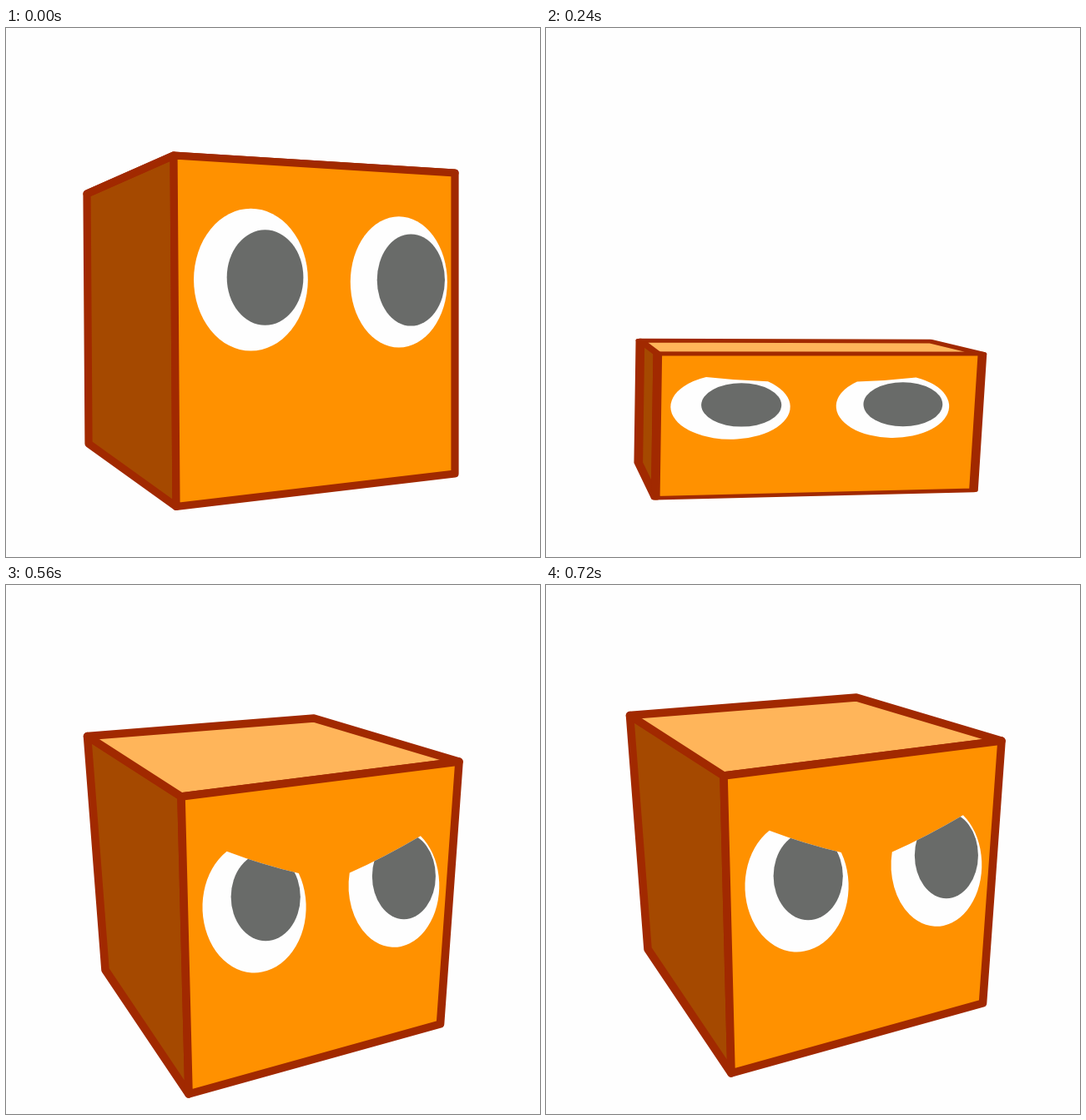
Recreate the animation shown at these times as an HTML page with a canvas. Size 640x635 px, loop 0.88 s.

```html
<!DOCTYPE html>
<html lang="en">
<head>
<meta charset="utf-8">
<title>Bouncing cube</title>
<style>
html, body { margin: 0; width: 100%; height: 100%; overflow: hidden; background: #fefefe; }
canvas { display: block; }
</style>
</head>
<body>
<canvas id="stage" width="640" height="635"></canvas>
<script>
const ctx = document.getElementById('stage').getContext('2d');
const LOOP = 880, STEP = 80;
const OPEN = [[-90, -90], [-90, -90]];

// front: corners clockwise from top left. back: top left, bottom left, far corner of the visible cap.
// pen: stroke width and its vertical squash. eyes: centres as fractions of the front face.
// size: eye radii as fractions of the face. gaze: pupil shift in eye radii.
// lids: angles in degrees where each lid meets the rim of its eye.
const rest = {
  front: [[201, 153], [538, 174], [538, 535], [204, 574.5]],
  back: [[97, 199], [99, 499], [201, 153]],
  pen: [9.2, 1],
  eyes: [[.272, .354], [.8, .362]], size: [.19, .211], gaze: [.25, -.03], lids: OPEN
};
const squash = {
  front: [[143.5, 341.5], [531, 342], [508, 548.5], [144, 569.5]],
  back: [[96.5, 306], [98, 474], [390, 308]],
  pen: [9.7, .57],
  eyes: [[.25, .379], [.763, .392]], size: [.184, .235], gaze: [.175, -.08], lids: OPEN
};
const flat = {
  front: [[126, 430.5], [516.5, 430.5], [516, 560], [121, 560]],
  back: [[126, 430.5], [121, 560], [516.5, 430.5]],
  pen: [11.5, .33],
  eyes: [[.211, .367], [.707, .367]], size: [.177, .223], gaze: [.19, -.04],
  lids: [[-133, -20], [-160, -46]]
};
const leap = {
  front: [[138, 74], [477, 108], [523, 437.5], [138, 439]],
  back: [[94, 218], [92, 501], [386, 497]],
  pen: [9, 1],
  eyes: [[.268, .325], [.792, .32]], size: [.184, .249], gaze: [.235, -.055], lids: OPEN
};
const land = {
  front: [[210, 254], [543, 212], [520.5, 527], [219, 611]],
  back: [[97.5, 181.5], [119, 462], [369, 160]],
  pen: [9.6, 1],
  eyes: [[.262, .415], [.786, .432]], size: [.183, .228], gaze: [.22, -.155],
  lids: [[-122, -31], [-168, -54]]
};

// Blends numbers, lists or whole poses.
function mix(a, b, k) {
  if (typeof a === 'number') return a + (b - a) * k;
  if (Array.isArray(a)) return a.map((v, i) => mix(v, b[i], k));
  return Object.fromEntries(Object.keys(a).map(key => [key, mix(a[key], b[key], k)]));
}

// Rest, sink with an ease-out, leap, land, then rebound.
function poseAt(step) {
  if (step < 2) return [rest];
  if (step < 6) return [mix(squash, flat, 1 - ((5 - step) / 3) ** 2)];
  if (step === 6) return [leap];
  if (step === 7) return [land];
  return step === 8 ? [land, -6, -40] : [land, 3, -25];
}

function face(points, color, [width, squeeze]) {
  ctx.beginPath();
  points.forEach(p => ctx.lineTo(...p));
  ctx.closePath();
  ctx.fillStyle = color;
  ctx.fill();
  ctx.save();
  ctx.scale(1, squeeze);
  ctx.lineWidth = width;
  ctx.lineJoin = 'round';
  ctx.strokeStyle = '#a12900';
  ctx.stroke();
  ctx.restore();
}

function drawEye({ front, eyes, size, gaze, lids }, side) {
  const [tl, tr, br, bl] = front, [u, v] = eyes[side];
  const on = (s, t) => mix(mix(tl, tr, s), mix(bl, br, s), t);
  const tall = s => on(s, 1)[1] - on(s, 0)[1];
  const [x, y] = on(u, v);
  const near = (tall(u) / tall(.5)) ** 2;
  const rx = size[0] * near * (on(1, v)[0] - on(0, v)[0]);
  const ry = size[1] * tall(u);
  const [a, b] = lids[side].map(deg => deg * Math.PI / 180);
  const rim = angle => [x + rx * Math.cos(angle), y + ry * Math.sin(angle)];
  const [midX, midY] = mix(rim(a), rim(b), .5);

  ctx.save();
  ctx.beginPath();
  ctx.ellipse(x, y, rx, ry, 0, b, a + 2 * Math.PI);
  if (a < b) ctx.quadraticCurveTo(midX, midY + ry * .04, ...rim(b));
  ctx.fillStyle = '#fefefe';
  ctx.fill();
  ctx.clip();
  ctx.beginPath();
  const pupil = .67 + .03 * side;
  ctx.ellipse(x + gaze[0] * rx, y + gaze[1] * ry, rx * pupil, ry * pupil, 0, 0, 2 * Math.PI);
  ctx.fillStyle = '#696b69';
  ctx.fill();
  ctx.restore();
}

function draw(pose, dx = 0, dy = 0) {
  const { front, back, pen } = pose;
  const [tl, tr, br, bl] = front, [backTop, backBase, far] = back;
  const fromBelow = far[1] > bl[1];
  ctx.fillStyle = '#fefefe';
  ctx.fillRect(0, 0, 640, 635);
  ctx.save();
  ctx.translate(dx, dy);
  face([backTop, tl, bl, backBase], '#a54900', pen);
  face(fromBelow ? [backBase, bl, br, far] : [backTop, tl, tr, far], '#ffb55a', pen);
  face(front, '#ff9100', pen);
  drawEye(pose, 0);
  drawEye(pose, 1);
  ctx.restore();
}

function tick() {
  draw(...poseAt(Math.floor(performance.now() % LOOP / STEP)));
  requestAnimationFrame(tick);
}
tick();
</script>
</body>
</html>
```
